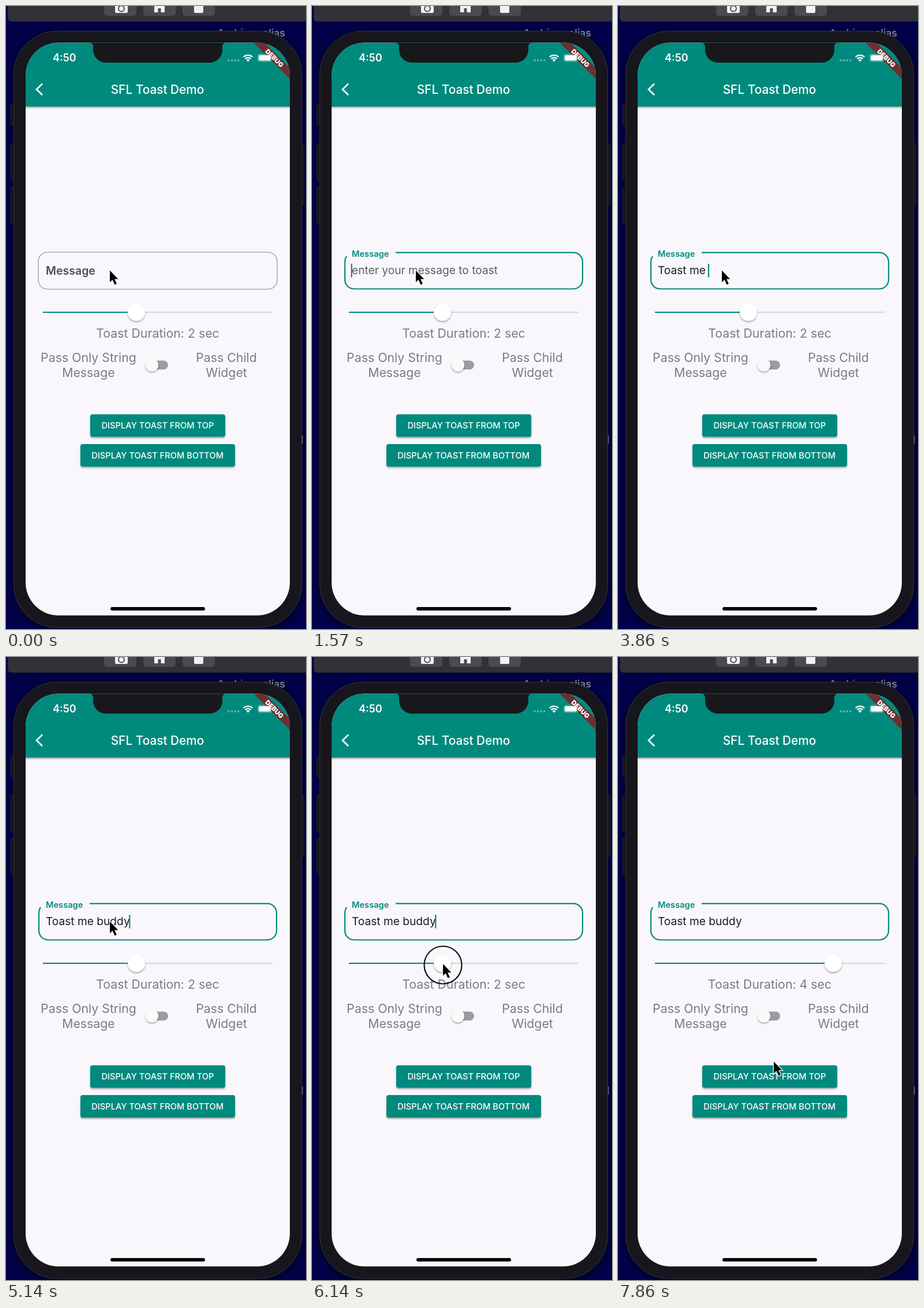
Write an HTML page that moves like this. It is 520 px wide and 1078 px high and loops after 8 s.

```html
<!DOCTYPE html>
<html lang="en">
<head>
<meta charset="utf-8">
<title>Toast demo</title>
<style>
  html, body { margin: 0; height: 100%; overflow: hidden; background: #01014a; }
  svg { display: block; width: 520px; height: 1078px; font-family: Inter, sans-serif; }
  text { white-space: pre; }
  .mid { text-anchor: middle; }
  .body { font-size: 21.3px; fill: #7d7b80; }
  .input { font-size: 19.150px; }
  .button { font-size: 14.7px; font-weight: 500; fill: #fff; }
  .teal { fill: #028a7e; }
  .line { fill: none; stroke: #028a7e; stroke-width: 2.2; }
</style>
</head>
<body>
<svg viewBox="0 0 520 1078">
  <defs>
    <clipPath id="screen"><rect x="34" y="63.500" width="458" height="991" rx="57"/></clipPath>
    <filter id="soft" x="-50%" y="-50%" width="200%" height="200%">
      <feDropShadow dx="0" dy="2" stdDeviation="1.6" flood-opacity=".35"/>
    </filter>
    <filter id="halo" x="-10%" y="-10%" width="120%" height="120%">
      <feDropShadow dx="0" dy="4" stdDeviation="9" flood-opacity=".6"/>
    </filter>
  </defs>

  <!-- desktop -->
  <rect width="520" height="1078" fill="#01014a"/>
  <text x="366" y="53" font-size="17.500" font-weight="600" fill="#8b8b92">Archives alias</text>
  <text x="508" y="563" font-size="16" fill="#77778a">)</text>
  <text x="511" y="757" font-size="18" font-weight="600" fill="#8b8b92">l</text>
  <rect x="3" y="-10" width="530" height="37" rx="6" fill="#323138" stroke="#1d1c24"/>
  <g fill="#4b4a51">
    <rect x="170" y="-10" width="56" height="27" rx="5"/>
    <rect x="238" y="-10" width="56" height="27" rx="5"/>
    <rect x="306" y="-10" width="56" height="27" rx="5"/>
  </g>
  <g fill="#f2f2f4">
    <rect x="189" y="-4" width="22" height="16" rx="2.500"/>
    <circle cx="200" cy="4.500" r="5" fill="none" stroke="#4b4a51" stroke-width="2"/>
    <path d="M257 -6H275V11H268.500V4H263.500V11H257Z"/>
    <rect x="326" y="-6" width="16" height="18" rx="2"/>
  </g>

  <!-- phone -->
  <g fill="#1a1a1c" stroke="#2c2b30">
    <rect x="8.500" y="170.500" width="8" height="37" rx="2"/>
    <rect x="8.500" y="238.500" width="8" height="64" rx="2"/>
    <rect x="8.500" y="312.500" width="8" height="64" rx="2"/>
    <rect x="509.500" y="238.500" width="7" height="107" rx="2"/>
    <rect x="13.500" y="43.500" width="499" height="1032" rx="75" fill="#18181a" stroke="#353438" filter="url(#halo)"/>
  </g>

  <g clip-path="url(#screen)">
    <rect x="34" y="63" width="458" height="992" fill="#f9f7fb"/>
    <rect x="24" y="53" width="478" height="121" class="teal" filter="url(#soft)"/>
    <g transform="translate(492 63.500) rotate(45)">
      <rect x="-48" y="31" width="96" height="13.300" fill="#6c2f30"/>
      <text class="mid" y="41.800" font-size="11.300" font-weight="900" fill="#fff">DEBUG</text>
    </g>
    <path d="M143 63Q151 63 151 71V76A22 22 0 0 0 173 98H353A22 22 0 0 0 375 76V71Q375 63 383 63Z" fill="#18181a"/>
  </g>
  <g fill="#fff">
    <text x="81" y="96" font-size="18" font-weight="600">4:50</text>
    <g opacity=".35">
      <circle cx="386" cy="94" r="1.900"/><circle cx="391.600" cy="94" r="1.900"/>
      <circle cx="397.200" cy="94" r="1.900"/><circle cx="402.800" cy="94" r="1.900"/>
    </g>
    <path d="M419.500 96.500L416.600 93.400A4.200 4.200 0 0 1 422.400 93.400Z"/>
    <path d="M411.800 88.200A11 11 0 0 1 427.200 88.200M414.600 91.400A7 7 0 0 1 424.400 91.400" fill="none" stroke="#fff" stroke-width="2.300"/>
    <rect x="436.500" y="83.500" width="24" height="12.500" rx="3.500" fill="none" stroke="#fff" stroke-opacity=".45"/>
    <rect x="438" y="85" width="21" height="9.500" rx="2"/>
    <path d="M63 134.500L53 144.300L63 154" fill="none" stroke="#fff" stroke-width="2.700"/>
    <text class="mid" x="262.500" y="151.500" font-size="20.800" font-weight="500">SFL Toast Demo</text>
  </g>

  <!-- message field -->
  <rect id="idle" x="56" y="426" width="414" height="64" rx="16" fill="none" stroke="#8a888c" stroke-width="1.100"/>
  <path id="active" class="line" d="M145 426.700H453A16 16 0 0 1 469 442.700V473.500A16 16 0 0 1 453 489.500H73A16 16 0 0 1 57 473.500V442.700A16 16 0 0 1 60 433"/>
  <text id="label" font-size="19.500" font-weight="600">Message</text>
  <text id="hint" class="input" x="69" y="464" fill="#5f5d62">enter your message to toast</text>
  <text id="typed" class="input" x="69" y="464" fill="#1c1b1f"></text>
  <rect id="caret" class="teal" y="446" width="2.200" height="23.500"/>

  <!-- slider -->
  <path d="M64 530H462" stroke="#d9d8dc" stroke-width="2.400"/>
  <path id="fill" class="line"/>
  <circle id="thumb" cy="530" r="15" fill="#fff" filter="url(#soft)"/>
  <text id="duration" class="body mid" x="263" y="574"></text>

  <!-- switch -->
  <g class="body mid">
    <text x="143" y="616">Pass Only String</text>
    <text x="143" y="642">Message</text>
    <text x="382" y="616">Pass Child</text>
    <text x="382" y="642">Widget</text>
  </g>
  <rect x="247" y="613.500" width="34" height="15.500" rx="7.700" fill="#9d9b9f"/>
  <circle cx="253" cy="621.300" r="11" fill="#fafafa" filter="url(#soft)"/>

  <!-- buttons -->
  <g class="teal" filter="url(#soft)">
    <rect x="146" y="706.500" width="234" height="39" rx="4"/>
    <rect x="129" y="758" width="268" height="39" rx="4"/>
  </g>
  <g class="button mid">
    <text x="263" y="731">DISPLAY TOAST FROM TOP</text>
    <text x="262.700" y="782.500">DISPLAY TOAST FROM BOTTOM</text>
  </g>
  <rect x="181" y="1040" width="164" height="6" rx="3" fill="#050505"/>

  <g id="pointer">
    <circle id="ring" cy="2" r="32.500" fill="none" stroke="#111" stroke-width="2.200"/>
    <path d="M0 0V20.500L4.600 16.200L8.500 24.800L11.900 23.300L8.200 14.900H14.300Z" stroke="#fff" stroke-width="2.400" paint-order="stroke"/>
  </g>
</svg>

<script>
const LOOP = 8000, FPS = 7;
const MESSAGE = 'Toast me buddy';
const FOCUS = 8;
// Ticks at which each letter of the message is typed
const KEYS = [18, 19, 20, 21, 22, 23, 25, 26, 27, 29, 31, 32, 33, 35];
// Pointer path: tick, x, y
const PATH = [[38, 180, 457.5], [42, 227, 531], [43, 227, 531], [48, 333.5, 534.5],
              [50, 373, 535], [51, 373, 535], [55, 270, 700]];

const el = Object.fromEntries([...document.querySelectorAll('svg [id]')].map(e => [e.id, e]));
const set = (e, attrs) => { for (const name in attrs) e.setAttribute(name, attrs[name]); };
const clamp = (v, lo, hi) => Math.min(hi, Math.max(lo, v));
const between = (v, lo, hi) => v >= lo && v <= hi;

function pointerAt(tick) {
  const next = PATH.findIndex(p => p[0] > tick);
  if (next === 0) return PATH[0].slice(1);
  if (next < 0) return PATH.at(-1).slice(1);
  const [t0, x0, y0] = PATH[next - 1], [t1, x1, y1] = PATH[next];
  const f = (tick - t0) / (t1 - t0);
  return [x0 + (x1 - x0) * f, y0 + (y1 - y0) * f];
}

function drawField(tick) {
  const focus = clamp((tick - FOCUS + 2) / 2, 0, 1);
  const count = KEYS.filter(k => k <= tick).length;
  const lastKey = count ? KEYS[count - 1] : FOCUS;
  set(el.idle, { opacity: focus ? 0 : 1 });
  set(el.active, { opacity: focus ? 1 : 0 });
  set(el.label, {
    transform: `translate(69 ${465 - 31.5 * focus}) scale(${1 - 0.25 * focus})`,
    fill: focus ? '#028a7e' : '#504d52'
  });
  set(el.hint, { opacity: count ? 0 : focus });
  el.typed.textContent = MESSAGE.slice(0, count);
  set(el.caret, {
    x: 67.5 + (count ? el.typed.getComputedTextLength() : 0),
    opacity: tick >= FOCUS && (tick - lastKey) % FPS < 4 ? 1 : 0
  });
}

function drawSlider(tick, x) {
  const stop = i => 79 + 73.5 * i;
  const seconds = tick < 43 ? 2 : tick > 50 ? 4 : Math.round((x - 79) / 73.5);
  set(el.fill, { d: `M64 530H${stop(seconds)}` });
  set(el.thumb, { cx: stop(seconds) });
  el.duration.textContent = `Toast Duration: ${seconds} sec`;
}

function draw(ms) {
  const tick = Math.floor((ms % LOOP) * FPS / 1000 + 0.04);
  const [x, y] = pointerAt(tick);
  drawField(tick);
  drawSlider(tick, x);
  set(el.pointer, { transform: `translate(${x} ${y})` });
  set(el.ring, { opacity: between(tick, 5, 7) || between(tick, 42, 51) ? 1 : 0 });
}

const start = performance.now();
(function frame() {
  draw(performance.now() - start);
  requestAnimationFrame(frame);
})();
</script>
</body>
</html>
```
